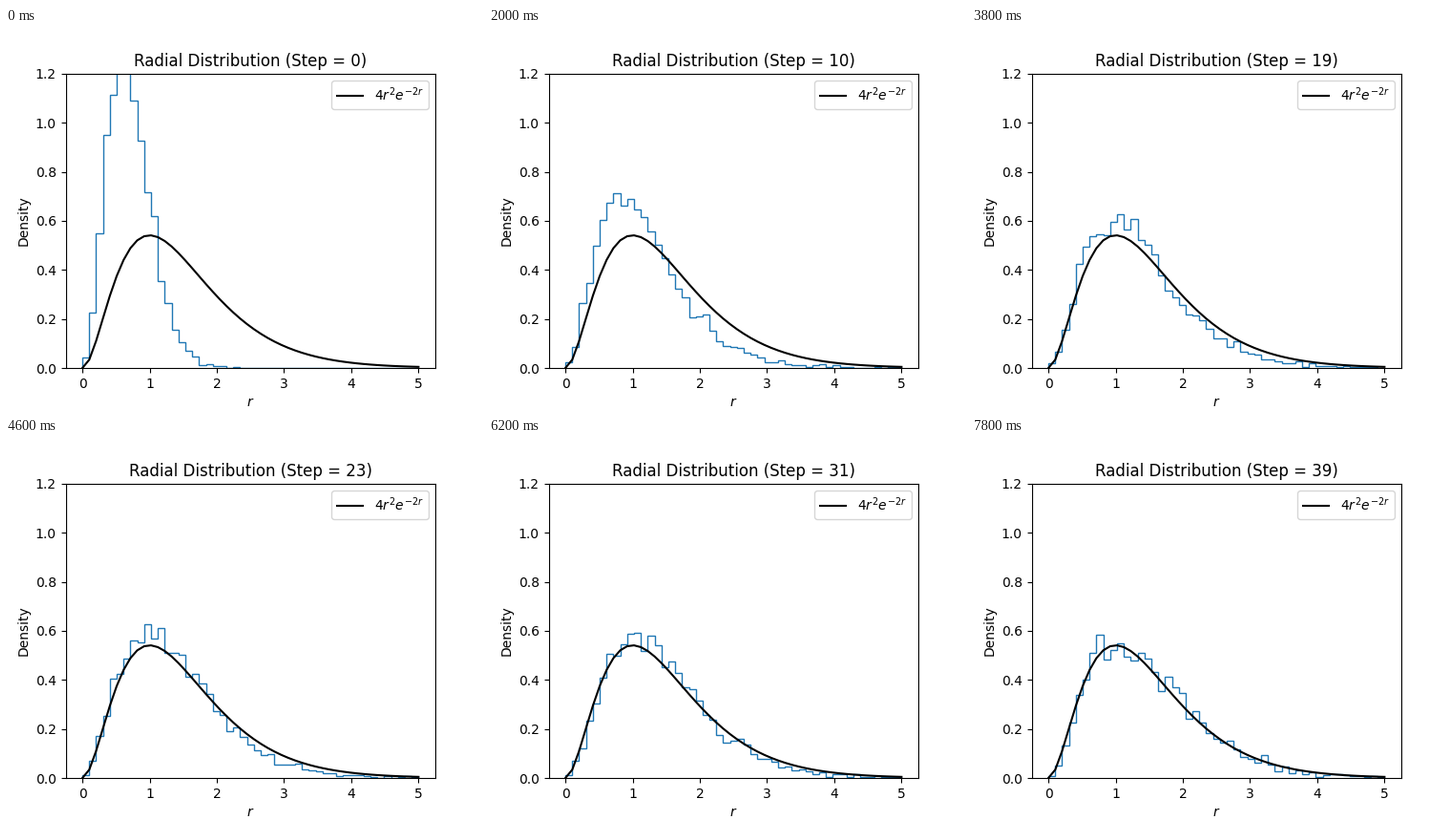
Animation, 500 px wide and 400 px high, one loop 8000 ms. Source, as a matplotlib script:

```python
import numpy as np
import matplotlib.pyplot as plt
from matplotlib.animation import FuncAnimation

STEPS = 40
INTERVAL = 200
WALKERS = 5000

edges = np.linspace(0, 5, 50)
width = edges[1] - edges[0]
centers = edges[:-1] + width / 2


def bin_chances(step):
    """Compact cloud relaxing towards 4 r^2 exp(-2r)."""
    peak = 1.03 - 0.45 * np.exp(-step / 11)
    power = 1 + 0.45 * np.exp(-step / 1.5) + 0.15 * np.exp(-step / 50)
    scale = peak / (2 / power) ** (1 / power)
    density = centers**2 * np.exp(-(centers / scale) ** power)
    return density / density.sum()


def histogram(step):
    rng = np.random.default_rng(100 + step)
    counts = rng.multinomial(WALKERS, bin_chances(step))
    return counts / (WALKERS * width)


fig, ax = plt.subplots(figsize=(5, 4), dpi=100)
ax.plot(edges, 4 * edges**2 * np.exp(-2 * edges), color="black",
        label=r"$4r^2e^{-2r}$")
bars = ax.stairs(histogram(0), edges, color="C0", linewidth=1)
ax.set_xlim(-0.25, 5.25)
ax.set_ylim(0, 1.2)
ax.set_xlabel("$r$")
ax.set_ylabel("Density")
ax.legend(loc="upper right")
title = ax.set_title("Radial Distribution (Step = 0)")


def update(step):
    bars.set_data(histogram(step))
    title.set_text(f"Radial Distribution (Step = {step})")
    return bars, title


anim = FuncAnimation(fig, update, frames=STEPS, interval=INTERVAL,
                     repeat=True, repeat_delay=0)
plt.show()
```
